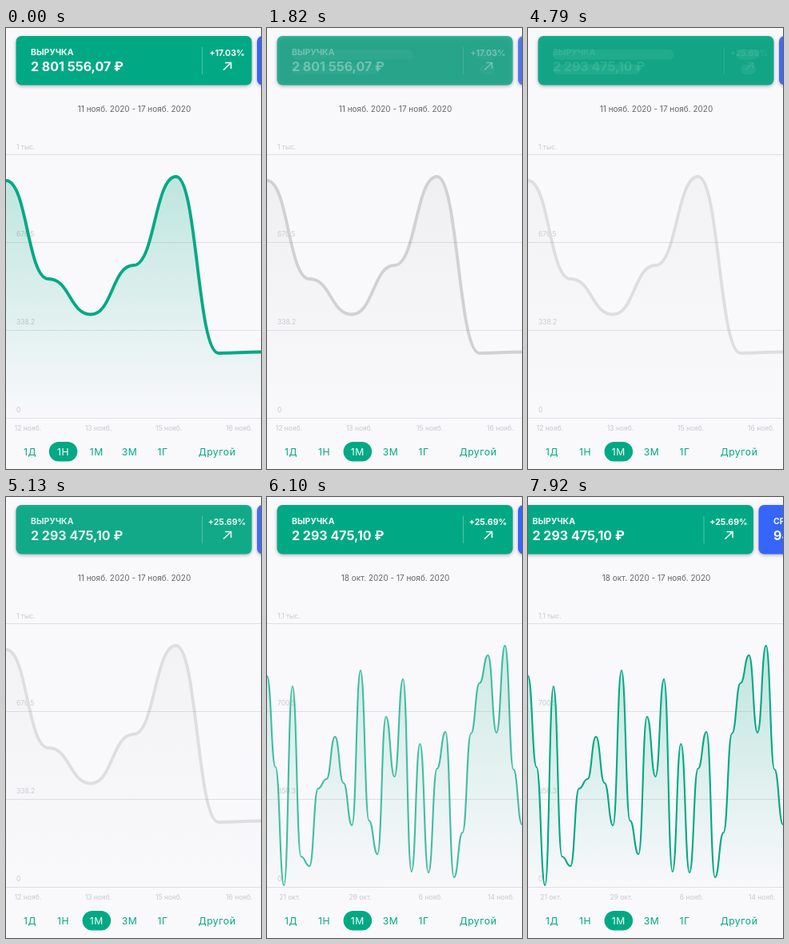
An HTML page with a canvas for the animation above (8 s loop, 319 by 552 pixels).

```html
<!DOCTYPE html>
<html lang="ru">
<head>
<meta charset="utf-8">
<title>Выручка</title>
<style>
html, body { margin: 0; width: 100%; height: 100%; overflow: hidden; background: #f9f8fb; }
canvas { display: block; width: 319px; height: 552px; }
</style>
</head>
<body>
<canvas></canvas>
<script>
const W = 319, H = 552, LOOP = 8000, BASE = 488.5;
const canvas = document.querySelector('canvas');
const ctx = canvas.getContext('2d');
const dpr = window.devicePixelRatio || 1;
canvas.width = W * dpr;
canvas.height = H * dpr;

const GREEN = [0, 169, 132], BLUE = [53, 101, 251];
const GRAY = [206, 208, 210], PALE = [228, 228, 230], SOFT = [222, 222, 225];

const week = {
  dates: '11 нояб. 2020 - 17 нояб. 2020',
  yLabels: ['1 тыс.', '676.5', '338.2', '0'],
  xLabels: ['12 нояб.', '13 нояб.', '15 нояб.', '16 нояб.'],
  xStart: 27.5,
  sum: '2 801 556,07 ₽', change: '+17.03%', width: 3.8,
  points: [191, 314, 358.5, 297, 186, 407, 405.5]
};
const month = {
  dates: '18 окт. 2020 - 17 нояб. 2020',
  yLabels: ['1.1 тыс.', '700.5', '350.3', '0'],
  xLabels: ['21 окт.', '29 окт.', '6 нояб.', '14 нояб.'],
  xStart: 28.5,
  sum: '2 293 475,10 ₽', change: '+25.69%', width: 2.1,
  points: [224, 338, 486, 237, 450, 462, 365, 353, 300, 358, 411, 217, 405, 447, 275, 350,
    228, 469, 309, 470, 340, 294, 476, 420, 296, 233, 198, 295, 186, 341, 410]
};

const rgba = (c, a = 1) => `rgba(${c.join()},${a})`;
const white = a => `rgba(255,255,255,${a})`;
const span = (t, from, to) => Math.min(1, Math.max(0, (t - from) / (to - from)));
const smooth = u => u * u * (3 - 2 * u);
const mix = (a, b, u) => a.map((v, i) => v + (b[i] - v) * u);

function text(str, x, y, size, color, { weight = 400, align = 'left', spacing = 0 } = {}) {
  ctx.font = `${weight} ${size}px Inter, sans-serif`;
  ctx.letterSpacing = spacing + 'px';
  ctx.textAlign = align;
  ctx.fillStyle = color;
  ctx.fillText(str, x, y);
}

function box(x, y, w, h, r, color) {
  ctx.fillStyle = color;
  ctx.beginPath();
  ctx.roundRect(x, y, w, h, r);
  ctx.fill();
}

function line(color, width, ...points) {
  ctx.strokeStyle = color;
  ctx.lineWidth = width;
  ctx.beginPath();
  points.forEach(([x, y]) => ctx.lineTo(x, y));
  ctx.stroke();
}

// One card; without data it shows placeholder bars.
function card(x, color, data, alpha) {
  if (alpha <= 0) return;
  ctx.save();
  ctx.translate(x, 0);
  ctx.globalAlpha = alpha;
  ctx.shadowColor = 'rgba(0,0,0,.28)';
  ctx.shadowBlur = 4 * dpr;
  ctx.shadowOffsetY = 1.5 * dpr;
  box(0.5, 10, 295, 61.5, 7, rgba(color));
  ctx.shadowColor = 'transparent';
  line(white(data ? 0.3 : 0.1), 1, [233.5, 24], [233.5, 58]);
  if (data) {
    text(data.title, 19, 34, 10.5, white(0.95), { weight: 700 });
    text(data.sum, 19, 54, 16, '#fff', { weight: 700 });
    text(data.change, 264.5, 34.5, 10.5, '#fff', { weight: 700, align: 'center' });
    line('#fff', 1.6, [260, 52.5], [269.5, 43.5]);
    line('#fff', 1.6, [262, 43.5], [269.5, 43.5], [269.5, 51]);
  } else {
    for (const [left, top, w] of [[19, 27, 151.5], [19, 45.5, 109.5], [249, 27, 28], [254, 45.5, 19]])
      box(left, top, w, 12.5, 6.2, white(0.09));
  }
  ctx.restore();
}

function cards(t) {
  const toBars = smooth(span(t, 1450, 2050));
  const toData = smooth(span(t, 4670, 5250));
  const shift = -25.5 * span(t, 7600, 7920) ** 2;
  const data = t < 4670 ? week : month;
  const full = t < 4670 ? 1 - toBars : toData;
  const row = [
    [12, GREEN, { ...data, title: 'ВЫРУЧКА' }],
    [313.5, BLUE, { title: 'СРЕДНИЙ ЧЕК', sum: '941,20 ₽', change: '+4.12%' }]
  ];
  for (const [x, color, content] of row) {
    card(x + shift, color, null, 1 - full);
    card(x + shift, color, content, full);
  }
}

function tracePoints(points) {
  const step = W / (points.length - 1);
  ctx.beginPath();
  ctx.moveTo(0, points[0]);
  points.slice(1).forEach((y, i) => {
    const mid = (i + 0.5) * step;
    ctx.bezierCurveTo(mid, points[i], mid, y, (i + 1) * step, y);
  });
}

function chart(data, color, alpha) {
  ctx.save();
  ctx.globalAlpha = alpha;
  const fade = ctx.createLinearGradient(0, 159, 0, BASE);
  fade.addColorStop(0, rgba(color, 0.26));
  fade.addColorStop(1, rgba(color, 0));
  tracePoints(data.points);
  ctx.lineTo(W, BASE);
  ctx.lineTo(0, BASE);
  ctx.fillStyle = fade;
  ctx.fill();
  tracePoints(data.points);
  ctx.strokeStyle = rgba(color);
  ctx.lineWidth = data.width;
  ctx.lineJoin = 'round';
  ctx.stroke();
  ctx.restore();
}

function axes(data) {
  data.yLabels.forEach((s, i) => text(s, 13, 151.5 + i * 109.9, 8.5, '#c9c9cd'));
  data.xLabels.forEach((s, i) =>
    text(s, data.xStart + i * 88.1, 504, 8.5, '#c9c9cd', { align: 'center' }));
}

function grid() {
  for (let i = 0; i < 4; i++) {
    const y = Math.floor(158.8 + i * 110) + 0.5;
    line('rgba(120,120,130,.2)', 1, [0, y], [W, y]);
  }
}

function tabs(active) {
  const names = ['1Д', '1Н', '1М', '3М', '1Г', 'Другой'];
  [30, 71.5, 113.3, 154.5, 196, 264].forEach((x, i) => {
    const on = i === active;
    if (on) box(x - 17.7, 518, 35.5, 24.5, 12.2, rgba(GREEN));
    text(names[i], x, 535, 12.2, on ? '#fff' : rgba(GREEN), { align: 'center', spacing: 0.5 });
  });
}

function weekColor(t) {
  if (t < 1750) return mix(GREEN, GRAY, span(t, 1450, 1750));
  if (t < 2770) return mix(GRAY, PALE, span(t, 1750, 2770));
  return mix(PALE, SOFT, span(t, 4340, 4790));
}

function draw(t) {
  ctx.setTransform(dpr, 0, 0, dpr, 0, 0);
  ctx.fillStyle = '#f9f8fb';
  ctx.fillRect(0, 0, W, H);
  const loaded = t >= 5720;
  const data = loaded ? month : week;
  text(data.dates, 160.5, 105, 10, '#66666a', { align: 'center' });
  axes(data);
  chart(data, loaded ? GREEN : weekColor(t), loaded ? span(t, 5720, 6240) : 1);
  grid();
  cards(t);
  tabs(t < 1450 ? 1 : 2);
}

const start = performance.now();
function tick() {
  draw((performance.now() - start) % LOOP);
  requestAnimationFrame(tick);
}
tick();
</script>
</body>
</html>
```
